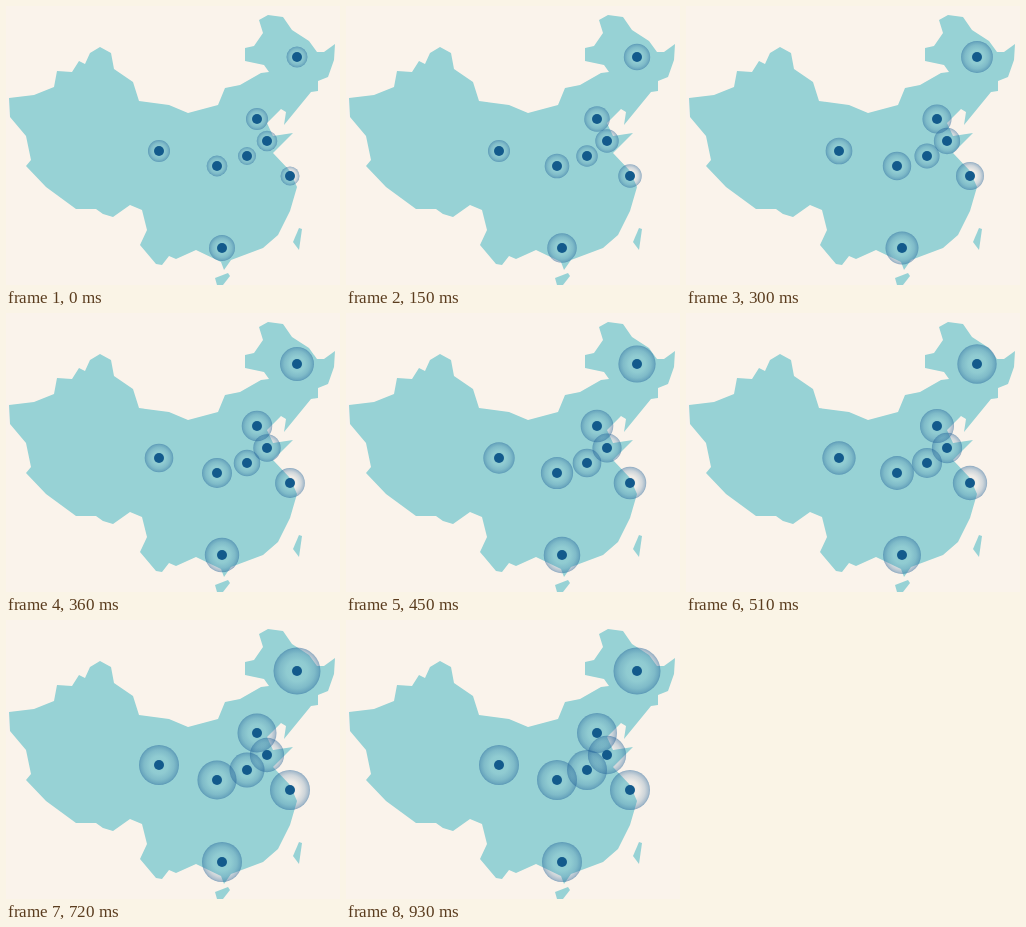
Recreate the animation shown at these times as an HTML page. Size 334 by 279 pixels, loop 1.06 s.

```html
<!DOCTYPE html>
<html lang="en">
<head>
<meta charset="utf-8">
<title>Pulsing map</title>
<style>
html, body { margin: 0; width: 100%; height: 100%; overflow: hidden; background: #faf3eb; }
svg { display: block; width: 100%; height: 100%; }
</style>
</head>
<body>
<svg viewBox="0 0 334 279">
  <defs>
    <radialGradient id="halo">
      <stop offset="0" stop-color="#1f5f97" stop-opacity=".03"/>
      <stop offset=".45" stop-color="#1f5f97" stop-opacity=".06"/>
      <stop offset=".75" stop-color="#1f5f97" stop-opacity=".2"/>
      <stop offset=".92" stop-color="#1f5f97" stop-opacity=".36"/>
      <stop offset="1" stop-color="#1f5f97" stop-opacity=".5"/>
    </radialGradient>
  </defs>
  <g fill="#97d2d5">
    <path d="M3 92L28 89 48 81 51 65 66 66 73 55 79 58 84 47 94 41 105 47 108 63 127 76 133 95 163 99 182 107 212 99 219 82 234 79 255 67 263 66 258 59 239 55 239 42 248 40 257 27 253 14 262 9 277 11 286 24 303 35 311 46 318 46 329 38 328 54 322 71 312 75 312 85 305 86 278 119 280 106 275 103 261 117 267 130 287 127 267 147 284 165 291 181 284 205 272 229 257 242 225 254 218 264 215 256 190 244 170 253 163 250 156 259 150 258 134 239 141 224 136 204 124 199 107 211 97 208 90 203 70 203 40 181 20 160 25 154 20 130 4 111Z"/>
    <path d="M293 222L296 223 293 244 287 236Z"/>
    <path d="M209 272L222 267 224 270 217 279 211 279Z"/>
  </g>
  <g id="halos" fill="url(#halo)"></g>
  <g id="dots" fill="#135a8c"></g>
</svg>
<script>
// x, y, radius at start, growth per ms, largest radius
const spots = [
  [291, 51, 10.5, .018, 23.5],
  [251, 113, 11, .0118, 20],
  [261, 135, 10.3, .0095, 20],
  [241, 150, 9, .0118, 20],
  [211, 160, 10.4, .0127, 20],
  [153, 145, 8.6, .0158, 20],
  [284, 170, 9.5, .015, 20],
  [216, 242, 13, .0117, 20]
];

function circle(parent, x, y, r) {
  const c = document.createElementNS("http://www.w3.org/2000/svg", "circle");
  c.setAttribute("cx", x);
  c.setAttribute("cy", y);
  c.setAttribute("r", r);
  return document.getElementById(parent).appendChild(c);
}

const halos = spots.map(([x, y, r]) => circle("halos", x, y, r));
spots.forEach(([x, y]) => circle("dots", x, y, 5));

function draw() {
  const time = performance.now() % 1060;
  const t = Math.min(Math.floor(time / 30) * 30, 930);
  spots.forEach(([x, y, start, rate, max], i) => {
    // the western halo starts its pulse with a brief wait
    const least = x === 153 ? 11 : start;
    halos[i].setAttribute("r", Math.min(max, Math.max(least, start + rate * t)));
  });
  requestAnimationFrame(draw);
}
draw();
</script>
</body>
</html>
```
